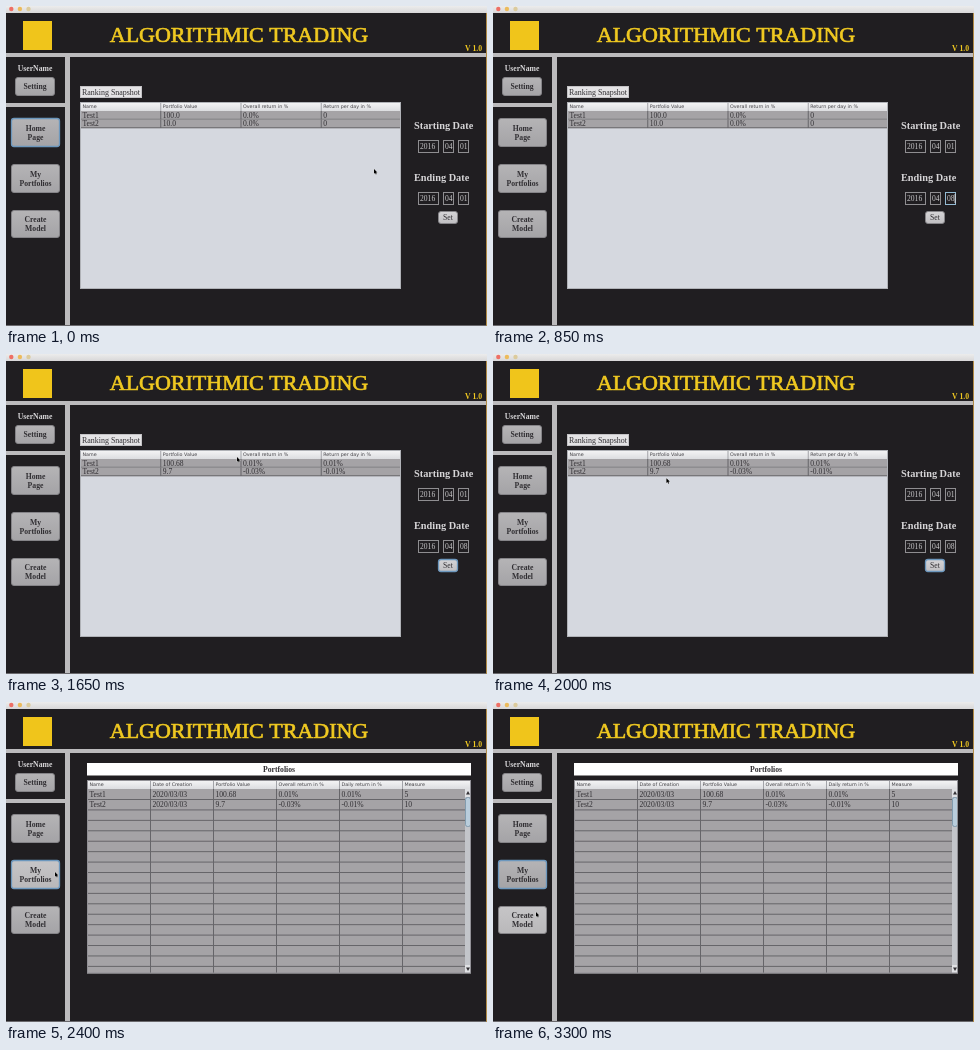
Write an HTML page with a canvas that moves like this. It is 481 px wide and 320 px high and loops after 3.35 s.

```html
<!DOCTYPE html>
<html lang="en">
<head>
<meta charset="utf-8">
<title>Algorithmic Trading</title>
<style>
html, body { margin: 0; width: 100%; height: 100%; overflow: hidden; background: #201e21; }
canvas { display: block; }
</style>
</head>
<body>
<canvas id="stage" width="481" height="320"></canvas>
<script>
const g = document.getElementById('stage').getContext('2d');
const LOOP = 3350, STEP = 50;
const SERIF = '"Liberation Serif", serif', SANS = '"DejaVu Sans", sans-serif';
const INK = '#302e32', GREY = '#bcbbbd', BLUE = '#6c97bd', GOLD = '#f0c921', LINE = '#666569';

// Moments of the clicks and key presses
const FIELD = 400, ERASE = 650, TYPE = 800, SET = 1250, RESULT = 1350, PRESS = 2250, PAGE = 2400;

// Pointer stops: time, x, y; it rests where two stops share a place
const path = [
  [0, 368, 163], [100, 368, 163], [350, 457, 192], [1000, 457, 194], [1200, 448, 208], [1350, 448, 208],
  [1600, 231, 103], [1850, 231, 103], [2250, 49, 170], [2400, 49, 170],
  [2700, 203, 94], [2900, 203, 94], [3250, 43, 210], [LOOP, 43, 210]
];

function rect(x, y, w, h, color) {
  g.fillStyle = color;
  g.fillRect(x, y, w, h);
}

function frame(x, y, w, h, color) {
  g.strokeStyle = color;
  g.lineWidth = 1;
  g.strokeRect(x + .5, y + .5, w - 1, h - 1);
}

function text(s, x, y, size, { color = INK, weight = 400, family = SERIF, align = 'left' } = {}) {
  g.font = `${weight} ${size}px ${family}`;
  g.textAlign = align;
  g.fillStyle = color;
  g.fillText(s, x, y);
}

function shade(y, h, top, bottom) {
  const fill = g.createLinearGradient(0, y, 0, y + h);
  fill.addColorStop(0, top);
  fill.addColorStop(1, bottom);
  return fill;
}

function pointer(t) {
  const i = path.findIndex(p => p[0] > t), [t0, x0, y0] = path[i - 1], [t1, x1, y1] = path[i];
  const k = (t - t0) / (t1 - t0), e = k * k * (3 - 2 * k);
  const x = x0 + (x1 - x0) * e, y = y0 + (y1 - y0) * e;
  const overField = x >= 452 && y >= 186 && y < 199;
  return { x, y, shown: !overField };
}

function button(lines, x, y, w, h, mouse, { focus = false, pressed = false, light = false } = {}) {
  const over = mouse.shown && mouse.x > x && mouse.x < x + w && mouse.y > y && mouse.y < y + h;
  const [top, bottom] = pressed ? ['#7b7a7d', '#929194']
    : over ? ['#c6c5c7', '#b9b8ba']
    : light ? ['#d6d5d7', '#bfbec1'] : ['#b5b4b6', '#a4a3a6'];
  g.beginPath();
  g.roundRect(x + .5, y + .5, w - 1, h - 1, 2.5);
  g.fillStyle = shade(y, h, top, bottom);
  g.fill();
  g.strokeStyle = focus ? BLUE : '#858488';
  g.lineWidth = focus ? 1.3 : 1;
  g.stroke();
  lines.forEach((s, i) =>
    text(s, x + w / 2, y + h / 2 + 2.6 + (i - (lines.length - 1) / 2) * 9, 7.7,
      { weight: light ? 400 : 700, align: 'center' }));
}

function chrome(t, mouse) {
  rect(0, 0, 481, 320, '#201e21');
  rect(0, 0, 481, 7, shade(0, 7, '#ececec', '#d8d7d8'));
  ['#ee6f65', '#ecbb5c', '#dccb9c'].forEach((c, i) => {
    g.beginPath();
    g.arc(5.3 + i * 8.6, 3, 2.2, 0, 7);
    g.fillStyle = c;
    g.fill();
  });
  rect(17, 15, 29, 29, '#f0c51b');
  text('ALGORITHMIC TRADING', 233, 36, 22, { color: GOLD, align: 'center' });
  g.strokeStyle = GOLD;
  g.lineWidth = .7;
  g.strokeText('ALGORITHMIC TRADING', 233, 36);
  text('V 1.0', 459, 45, 7.7, { color: GOLD, weight: 700 });
  rect(0, 47, 480, 4, GREY);
  rect(59, 51, 5, 268, GREY);
  rect(0, 97, 59, 4, GREY);
  rect(480, 7, 1, 313, '#b08a45');
  rect(0, 319, 480, 1, '#69686c');
  text('UserName', 29, 65, 7.7, { color: '#d8d7d9', weight: 700, align: 'center' });
  button(['Setting'], 9, 71, 40, 19, mouse);
  button(['Home', 'Page'], 5, 112, 49, 29, mouse, { focus: t < FIELD });
  button(['My', 'Portfolios'], 5, 158, 49, 29, mouse, { focus: t >= PRESS, pressed: t >= PRESS && t < PAGE });
  button(['Create', 'Model'], 5, 204, 49, 28, mouse);
}

function header(names, x, y, w, step) {
  rect(x, y, w, 9, shade(y, 9, '#f6f6f7', '#dcdde0'));
  names.forEach((s, i) => {
    text(s, x + 2.5 + i * step, y + 6.2, 4.8, { family: SANS, color: '#444347' });
    if (i) rect(x + i * step, y, 1, 9, '#a2a3a8');
  });
}

function dateRow(label, y, day, focus) {
  text(label, 408, y - 11, 10.3, { color: '#d6d5d7', weight: 700 });
  [['2016', 412, 21], ['04', 437, 11], [day, 452, 11]].forEach(([s, x, w], i) => {
    const active = focus && i === 2;
    frame(x, y, w, 13, active ? '#94bbd3' : '#8f8e91');
    text(s, x + 2, y + 9, 7.6, { color: '#c9c8ca' });
    if (active) rect(x + 2 + g.measureText(s).width, y + 2, 1, 9, '#d8d7d9');
  });
}

function home(t, mouse) {
  rect(74, 80, 62, 12, '#e4e3e5');
  frame(74, 80, 62, 12, '#c4c3c6');
  text('Ranking Snapshot', 76, 88.8, 7.95);
  rect(74, 96, 321, 187, '#d5d8df');
  header(['Name', 'Portfolio Value', 'Overall return in %', 'Return per day in %'], 74, 96, 321, 80.25);
  const rows = t >= RESULT
    ? [['Test1', '100.68', '0.01%', '0.01%'], ['Test2', '9.7', '-0.03%', '-0.01%']]
    : [['Test1', '100.0', '0.0%', '0'], ['Test2', '10.0', '0.0%', '0']];
  rows.forEach((row, r) => {
    const y = 105 + r * 8.5;
    rect(74, y, 321, 8.5, '#a5a3a6');
    rect(74, y + 7.8, 321, 1, LINE);
    row.forEach((s, c) => {
      text(s, 76.5 + c * 80.25, y + 6.8, 7.6);
      if (c) rect(74 + c * 80.25, y, 1, 8.5, LINE);
    });
  });
  frame(74, 96, 321, 187, '#b0b2b7');
  dateRow('Starting Date', 134, '01');
  dateRow('Ending Date', 186, t < ERASE ? '01' : t < TYPE ? '0' : '08', t >= FIELD && t < SET);
  button(['Set'], 432, 205, 20, 13, mouse,
    { light: true, focus: t >= SET && t < PRESS, pressed: t >= SET && t < RESULT });
}

function arrow(y, dir) {
  rect(459, y - 4, 6, 8, '#e0e1e4');
  g.beginPath();
  g.moveTo(460, y + dir * 1.5);
  g.lineTo(464, y + dir * 1.5);
  g.lineTo(462, y - dir * 2);
  g.fillStyle = INK;
  g.fill();
}

function portfolios() {
  rect(81, 61, 384, 12.5, '#fff');
  text('Portfolios', 273, 70, 7.7, { weight: 700, align: 'center' });
  rect(81, 78, 384, 193.5, '#a5a3a6');
  header(['Name', 'Date of Creation', 'Portfolio Value', 'Overall return in %', 'Daily return in %', 'Measure'],
    81, 78, 384, 63);
  for (let y = 97; y < 271; y += 10.43) rect(81, y, 378, 1, LINE);
  for (let x = 144; x < 459; x += 63) rect(x, 87, 1, 184, LINE);
  [['Test1', '2020/03/03', '100.68', '0.01%', '0.01%', '5'],
   ['Test2', '2020/03/03', '9.7', '-0.03%', '-0.01%', '10']].forEach((row, r) =>
    row.forEach((s, c) => text(s, 83.5 + c * 63, 94.5 + r * 10.4, 7.6)));
  rect(459, 87, 6, 184, '#c3c5ca');
  arrow(91, 1);
  arrow(267, -1);
  g.beginPath();
  g.roundRect(459.5, 95.5, 5, 29, 2);
  g.fillStyle = '#b9cddc';
  g.fill();
  g.strokeStyle = '#6a889e';
  g.lineWidth = .7;
  g.stroke();
  frame(81, 78, 384, 193.5, '#929196');
}

function drawPointer({ x, y, shown }) {
  if (!shown) return;
  g.save();
  g.translate(x, y);
  g.scale(.85, .85);
  g.beginPath();
  [[0, 0], [0, 5.6], [1.3, 4.5], [2.2, 6.5], [3.1, 6], [2.3, 4.1], [4, 4]].forEach(p => g.lineTo(...p));
  g.closePath();
  g.strokeStyle = '#ddd';
  g.lineWidth = .9;
  g.stroke();
  g.fillStyle = '#000';
  g.fill();
  g.restore();
}

function draw(now) {
  const t = Math.floor((now % LOOP) / STEP) * STEP, mouse = pointer(t);
  chrome(t, mouse);
  if (t < PAGE) home(t, mouse);
  else portfolios();
  drawPointer(mouse);
  requestAnimationFrame(draw);
}
requestAnimationFrame(draw);
</script>
</body>
</html>
```
